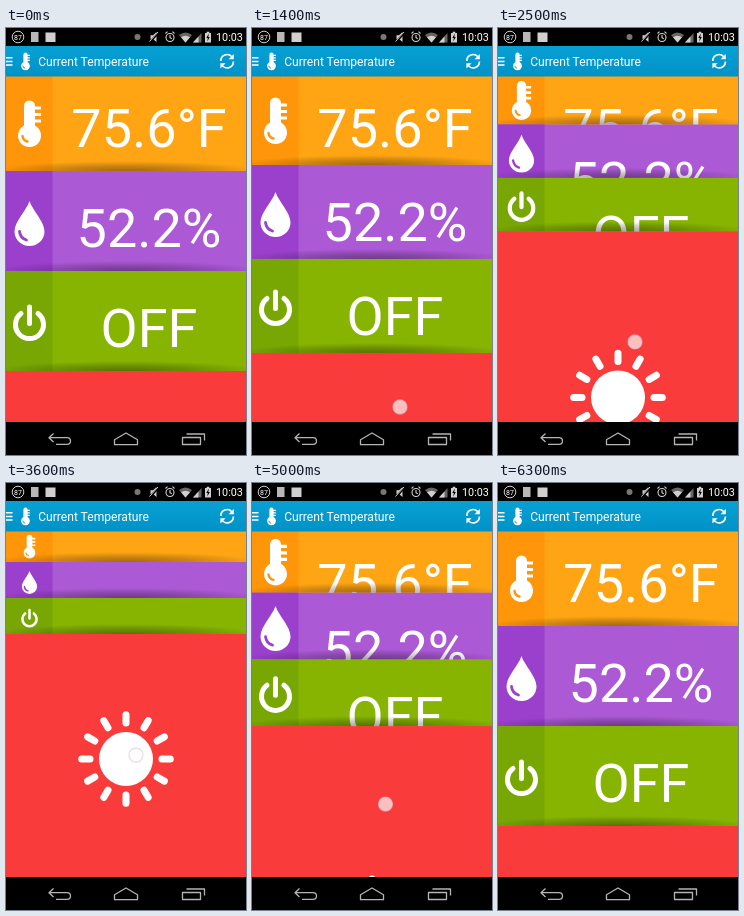
An HTML page for the animation above (8 s loop, 240x427 px).

```html
<!DOCTYPE html>
<html lang="en">
<head>
<meta charset="utf-8">
<title>Current Temperature</title>
<style>
  html, body { margin: 0; width: 100%; height: 100%; overflow: hidden; background: #000; }
  svg { display: block; width: 100vw; height: 100vh; }
  text { font-family: Roboto, sans-serif; fill: #fff; }
  .value { font-size: 54px; text-anchor: middle; }
  .line { fill: none; stroke: #fff; stroke-linecap: round; stroke-linejoin: round; }
  .flat { stroke-linecap: butt; }
  .nav { fill: none; stroke: #b4b4b4; stroke-width: 1.3; stroke-linejoin: round; }
</style>
</head>
<body>
<svg viewBox="0 0 240 427">
  <defs>
    <radialGradient id="shade" cx=".5" cy="1" r="1" gradientTransform="translate(.22 0) scale(.56 1)">
      <stop offset="0" stop-opacity=".36"/>
      <stop offset=".5" stop-opacity=".2"/>
      <stop offset="1" stop-opacity="0"/>
    </radialGradient>
    <linearGradient id="bar" x2="0" y2="1">
      <stop offset="0" stop-color="#08a0d4"/>
      <stop offset="1" stop-color="#0092c6"/>
    </linearGradient>
  </defs>

  <g id="panels"></g>

  <g id="header">
    <rect width="240" height="19"/>
    <rect y="18" width="240" height="30.500" fill="url(#bar)"/>
    <path class="line flat" stroke-width="1.500" d="M0 29.800H6.500M0 33.400H6.500M0 37H6.500"/>
    <g id="logo" transform="translate(19.500 33.300) scale(.38)"></g>
    <text x="32.200" y="37.700" font-size="12.100">Current Temperature</text>
    <g class="line flat" stroke-width="1.700">
      <path d="M214.800 33A6.300 6.300 0 0 1 225.800 28.700M227.400 33.500A6.300 6.300 0 0 1 216.400 37.800"/>
      <path fill="#fff" stroke="none" d="M227.800 26V31.200H222.600ZM214.400 40.500V35.300H219.600Z"/>
    </g>
  </g>

  <g id="status" fill="#d0d0d0">
    <circle cx="12" cy="9" r="5.800" fill="none" stroke="#d0d0d0"/>
    <text x="12" y="11.600" font-size="7" text-anchor="middle">87</text>
    <rect x="25" y="4" width="7.500" height="10" fill="#b8b8b8"/>
    <rect x="39.500" y="4.500" width="10" height="9.500"/>
    <circle cx="131.500" cy="9" r="3" fill="#777"/>
    <path d="M144.500 7.200h2.500L150.500 4v10L147 11h-2.500z"/>
    <path stroke="#000" stroke-width="2.200" d="M152.500 4.500L144 14"/>
    <path stroke="#d0d0d0" d="M152 4L143.500 13.500"/>
    <g fill="none" stroke="#d0d0d0" stroke-width="1.100">
      <circle cx="164" cy="9.500" r="4"/>
      <path d="M164 7v2.800l1.800 1M159.500 5.500l2-1.800M168.500 5.500l-2-1.800"/>
    </g>
    <path d="M179.500 14.500L173 7Q179.500 2 186 7Z" fill="#666"/>
    <path d="M179.500 14.500L175 9.300Q179.500 6 184 9.300Z"/>
    <path d="M187 14.500H195.500V5Z" fill="#666"/>
    <path d="M187 14.500H192.500V8.400Z"/>
    <path d="M199 5h1.700v-1.300h2.600V5H205v9.500h-6z"/>
    <path d="M202.800 5.500L200.300 10h1.500L201.300 13.500L203.800 9h-1.500Z" fill="#000"/>
    <text x="210" y="12.800" font-size="10.800">10:03</text>
  </g>

  <rect y="394" width="240" height="33"/>
  <g class="nav">
    <path d="M47.500 405.500L43 409.700L47.500 414M43 409.700H61Q64.500 409.700 64.500 413T61 416.300H50"/>
    <path d="M120 405L131.500 411.700V416.700H108.500V411.700Z"/>
    <path d="M176.500 409.500H194.500V416.500H176.500ZM180.500 406H198.500V412.500"/>
  </g>

  <circle id="dot" r="7" fill="#fff" fill-opacity=".67" stroke="#d6c6dc" stroke-opacity=".6" stroke-width="1.300"/>
</svg>

<script>
const LOOP = 8000, ORIGIN = 43;
const $ = id => document.getElementById(id);

// [time, row height]
const ROW = [[400, 100], [800, 99.3], [1400, 94], [2500, 53.5], [3000, 37], [3300, 36],
             [3700, 36], [3900, 37], [4300, 45.33], [5000, 66.67], [5700, 88], [6250, 100]];
// [time, x] and [time, y] of the touch
const TOUCH_X = [[400, 149], [1400, 148], [2500, 137], [3600, 130], [4300, 132], [5000, 133.5], [6250, 137]];
const TOUCH_Y = [[400, 389], [800, 387], [1400, 379], [2500, 314], [3000, 287], [3600, 272],
                 [4300, 288], [5000, 321], [6250, 376]];

// Monotone cubic curve through the points, flat at both ends
function curve(pts) {
  const last = pts.length - 1;
  const rise = i => (pts[i + 1][1] - pts[i][1]) / (pts[i + 1][0] - pts[i][0]);
  const slope = pts.map((_, i) => {
    if (i === 0 || i === last) return 0;
    const a = rise(i - 1), b = rise(i);
    return a * b > 0 ? 2 * a * b / (a + b) : 0;
  });
  return t => {
    if (t <= pts[0][0]) return pts[0][1];
    if (t >= pts[last][0]) return pts[last][1];
    let i = 0;
    while (t > pts[i + 1][0]) i++;
    const [t0, a] = pts[i], [t1, b] = pts[i + 1];
    const d = t1 - t0, u = (t - t0) / d, v = 1 - u;
    return a * v * v * (1 + 2 * u) + b * u * u * (3 - 2 * u) + d * u * v * (slope[i] * v - slope[i + 1] * u);
  };
}
const rowHeight = curve(ROW), touchX = curve(TOUCH_X), touchY = curve(TOUCH_Y);

const thermometer = tint => `
  <path fill="#fff" d="M-5.500 -17.500a5.500 5.500 0 0 1 11 0V2a11.500 11.500 0 1 1 -11 0Z"/>
  <path class="line flat" stroke-width="3.200" d="M4 -15.500h7.500M4 -9h7.500M4 -2.500h7.500"/>
  <path class="line" style="stroke:${tint}" stroke-width="2.400" d="M-7 12.500a6.500 6.500 0 0 0 5 5.500"/>`;
const drop = tint => `
  <path fill="#fff" d="M0 -22.500C3 -13 15 -2 15 8A15 14.500 0 0 1 -15 8C-15 -2 -3 -13 0 -22.500Z"/>
  <path class="line" style="stroke:${tint}" stroke-width="2.800" d="M-10 8A10 10 0 0 0 -3 16.500"/>`;
const power = () => `
  <path class="line" stroke-width="5" d="M-8.500 -10A14 14 0 1 0 8.500 -10M0 -16.500V0"/>`;

const rows = [
  { fill: '#ffa514', side: '#ff9609', value: '75.6°F', icon: thermometer },
  { fill: '#ab59d5', side: '#9a40cc', value: '52.2%', icon: drop },
  { fill: '#86b401', side: '#78a703', value: 'OFF', icon: power },
];

const shadow = '<rect y="-10" width="240" height="10" fill="url(#shade)"/>';
const rays = Array.from({ length: 12 }, (_, i) =>
  `<path class="line" stroke-width="7" d="M0 -36V-44.300" transform="rotate(${i * 30})"/>`).join('');

$('panels').innerHTML = rows.map((r, i) => `
  <g class="panel">
    ${i ? shadow : ''}
    <rect width="240" height="400" fill="${r.fill}"/>
    <rect width="46.500" height="400" fill="${r.side}"/>
    <g class="icon">${r.icon(r.side)}</g>
    <text class="value" x="143" y="76">${r.value}</text>
  </g>`).join('') + `
  <g class="panel">${shadow}<rect width="240" height="400" fill="#f93b3c"/></g>
  <g id="sun"><circle r="27" fill="#fff"/>${rays}</g>`;
$('logo').innerHTML = thermometer('#0099cc');

const panels = document.querySelectorAll('.panel');
const icons = document.querySelectorAll('.icon');
const values = document.querySelectorAll('.value');

function draw(t) {
  const h = rowHeight(t);
  const scale = Math.min(1, (h - 9) / 53);
  const fade = Math.max(0, Math.min(1, (h - 36) / 9));
  panels.forEach((p, i) => p.setAttribute('transform', `translate(0 ${ORIGIN + i * h})`));
  icons.forEach(el => el.setAttribute('transform', `translate(23.5 ${h / 2 + 2.5}) scale(${scale})`));
  values.forEach(el => el.setAttribute('opacity', fade));
  $('sun').setAttribute('transform', `translate(120 ${276 + 5.35 * (h - 36)})`);
  $('dot').setAttribute('transform', `translate(${touchX(t)} ${touchY(t)})`);
  $('dot').setAttribute('visibility', t >= 400 && t < 6200 ? 'visible' : 'hidden');
}

const start = performance.now();
function tick() {
  draw((performance.now() - start) % LOOP);
  requestAnimationFrame(tick);
}
tick();
</script>
</body>
</html>
```
